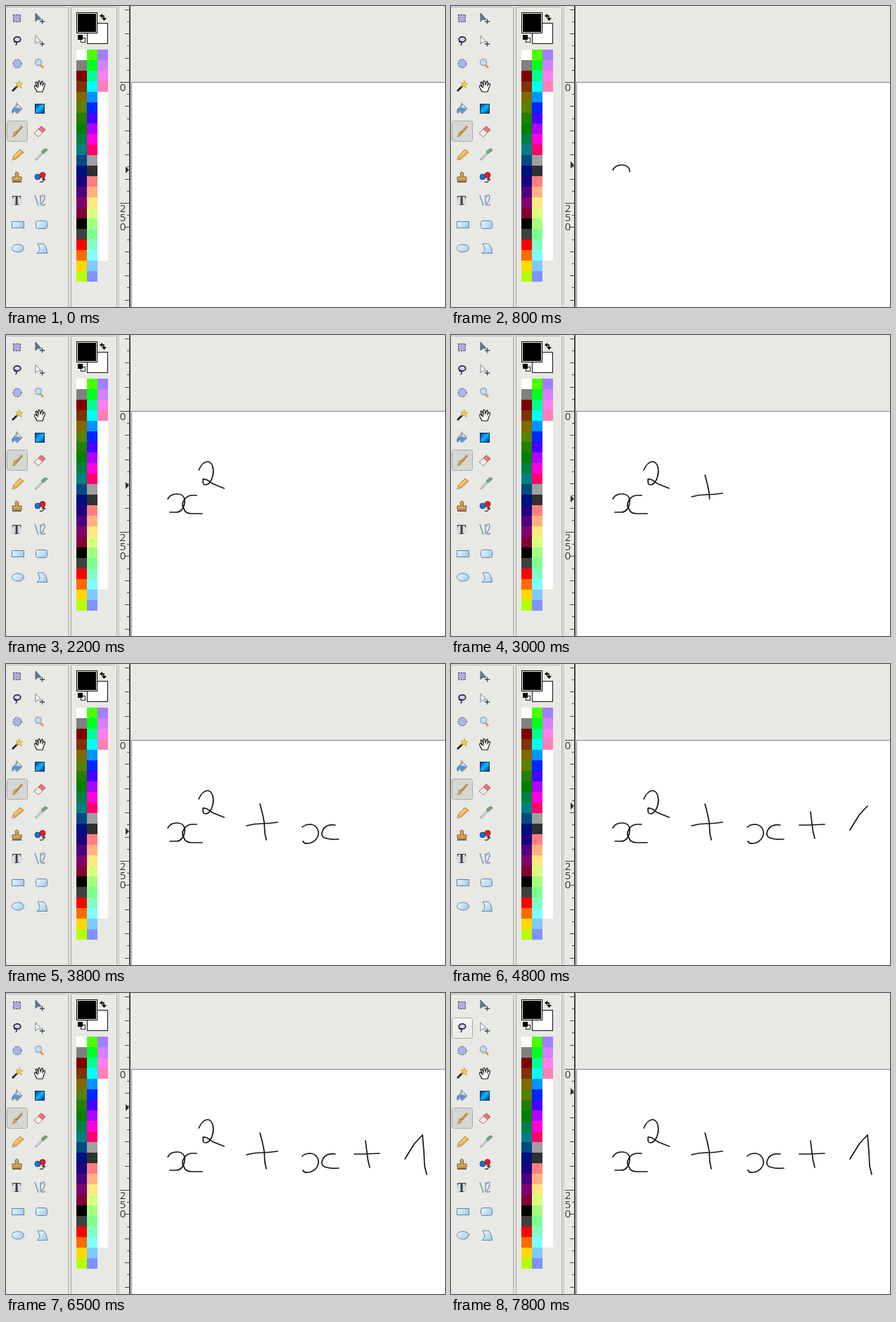
These frames come from a looping animation (624x428 px, 8 s). An HTML page with a canvas:

```html
<!DOCTYPE html>
<html lang="en">
<head>
<meta charset="utf-8">
<title>Handwritten formula in a paint program</title>
<style>
  html, body { margin: 0; width: 100%; height: 100%; overflow: hidden; background: #e8e8e4; }
  canvas { display: block; width: 624px; height: 428px; }
</style>
</head>
<body>
<canvas id="stage" width="624" height="428"></canvas>
<script>
const LOOP = 8000, STEP = 100;
const ctx = document.getElementById('stage').getContext('2d');
const PANEL = '#e8e8e4';

const swatches = [
  'fff 808080 800000 803300 806a00 5a8000 228000 008000 008044 008080 004a80 000f80 1b0080 4c0080 80006c 800037 000 404040 f00 ff6a00 ffd800 b5ff00',
  '4cff00 00ff21 00ff90 0ff 0094ff 0026ff 4800ff b200ff ff00dc ff006e a0a0a0 303030 ff7f7f ffb27f ffe97f daff7f a5ff7f 7fff8e 7fffc5 7fffff 7fc9ff 7f92ff',
  'a17fff d67fff ff7fed ff7fb6' + ' fff'.repeat(16)
].map(column => column.split(' '));

// Pen strokes: start ms, end ms, path
const strokes = [
  [600, 1000, 'M230 233C233 227 238 226 243 226C250 226 254 230 254 236C254 245 249 252 242 252L233 252'],
  [1100, 1500, 'M271 228L263 228C257 229 253 233 251 239Q250 244 253 247C254 252 259 254 265 254L279 254'],
  [1600, 2200, 'M274 192C277 185 282 180 287 180C294 181 296 192 294 200C292 208 288 213 284 213C280 213 280 211 280 205C286 204 289 209 295 212L310 218'],
  [2400, 2700, 'M342 230Q352 227 363 227Q374 227 386 225'],
  [2800, 3100, 'M361 199Q365 213 367 225L368 241L370 250'],
  [3200, 3500, 'M421 232C425 228 429 228 433 228C441 229 445 236 444 242C443 249 436 255 429 255Q424 256 422 252'],
  [3500, 3700, 'M468 229Q456 227 451 235C447 242 449 247 456 248Q462 250 473 249'],
  [3900, 4100, 'M495 229L509 229L531 228'],
  [4200, 4500, 'M511 210L513 226Q514 238 517 248'],
  [4600, 4800, 'M567 236Q575 223 580 215Q587 207 592 202'],
  [4800, 5000, 'M592 202L594 225L595 246L598 258']
].map(([start, end, d]) => {
  const shape = document.createElementNS('http://www.w3.org/2000/svg', 'path');
  shape.setAttribute('d', d);
  return { start, end, path: new Path2D(d), length: shape.getTotalLength() };
});

// Height of the pointer on the ruler
const pointerKeys = [
  [0, 233], [100, 231], [600, 231], [700, 229], [800, 226], [900, 240], [1000, 252],
  [1100, 230], [1200, 232], [1300, 246], [1400, 252], [1500, 229], [1600, 193],
  [1700, 186], [1800, 184], [1900, 199], [2000, 212], [2100, 209], [2200, 214],
  [2300, 214], [2400, 230], [2700, 225], [2800, 200], [3100, 249], [3200, 240],
  [3300, 229], [3400, 240], [3500, 252], [3600, 234], [3700, 248], [3800, 238],
  [3900, 230], [4100, 228], [4200, 211], [4500, 247], [4600, 236], [4800, 202],
  [4900, 230], [5000, 238], [5100, 240], [5300, 240], [5400, 226], [5500, 217],
  [5600, 217], [5700, 218], [5800, 218], [6500, 163], [6600, 140], [LOOP, 140]
];

const hovers = [[6800, 7200, 33, 99], [7200, 7800, 1, 67], [7800, LOOP, 1, 35]];

function rect(x, y, w, h, fill) {
  ctx.fillStyle = fill;
  ctx.fillRect(x, y, w, h);
}

function draw(d, fill, stroke, width = 1) {
  const path = typeof d === 'string' ? new Path2D(d) : d;
  if (fill) { ctx.fillStyle = fill; ctx.fill(path); }
  if (stroke) { ctx.strokeStyle = stroke; ctx.lineWidth = width; ctx.stroke(path); }
}

function oval(x, y, rx, ry, fill, stroke, width) {
  const path = new Path2D();
  path.ellipse(x, y, rx, ry, 0, 0, Math.PI * 2);
  draw(path, fill, stroke, width);
}

function box(x, y, w, h, r, fill, stroke) {
  const path = new Path2D();
  path.roundRect(x + .5, y + .5, w - 1, h - 1, r);
  draw(path, fill, stroke);
}

function blend(x0, y0, x1, y1, ...colors) {
  const g = ctx.createLinearGradient(x0, y0, x1, y1);
  colors.forEach((c, i) => g.addColorStop(i / (colors.length - 1), c));
  return g;
}

function label(text, x, y, font, fill) {
  ctx.font = font;
  ctx.fillStyle = fill;
  ctx.textAlign = 'center';
  ctx.fillText(text, x, y);
}

function drawPanels() {
  rect(0, 0, 624, 428, PANEL);
  for (const [x, w] of [[0, 88], [92, 66]]) rect(x, 1, w, 1, '#b4b4b0');
  for (const x of [88, 157]) {
    rect(x - 1, 1, 1, 427, '#f6f6f3');
    rect(x, 1, 1, 427, '#a4a4a0');
    rect(x + 1, 0, 2, 428, '#dededa');
  }
  rect(92, 1, 1, 427, '#a4a4a0');
  rect(160, 0, 1, 428, '#c8c8c4');
  rect(178, 108, 446, 320, '#85858a');
  rect(179, 109, 445, 319, '#fff');
}

function drawRuler() {
  rect(175, 0, 2, 428, '#444');
  for (let i = -7; i <= 18; i++) {
    const y = Math.round(108 + i * 17.2);
    const size = i % 10 === 0 ? 14 : i % 2 === 0 ? 7 : 4;
    rect(176 - size, y, size, 1, '#444');
  }
  const font = '15px "Open Sans", "Noto Sans", sans-serif';
  [['0', 121], ['2', 293], ['5', 306], ['0', 319]].forEach(([c, y]) => label(c, 166, y, font, '#333'));
}

function drawPalette() {
  rect(115, 24, 30, 30, '#111');
  rect(116, 25, 28, 28, '#fff');
  rect(100, 9, 30, 30, '#000');
  rect(101, 10, 28, 28, '#fff');
  rect(102, 11, 26, 26, '#000');
  draw('M135 14H139V18', null, '#000', 1.5);
  draw('M133 14L137 11V17ZM136 17H143L139.5 21Z', '#000');
  rect(106, 45, 7, 7, '#222');
  rect(107, 46, 5, 5, '#fff');
  rect(102, 41, 7, 7, '#000');
  swatches.forEach((column, i) => column.forEach((color, row) =>
    rect(100 + i * 15, 62 + row * 15, 15, 15, '#' + color)));
}

function arrowTool(y, fill, stroke) {
  draw(`M42 ${y - 8}V${y + 4}L45 ${y + 1}L50 ${y + 1}Z`, fill, stroke);
  draw(`M48 ${y + 4}H55M51.5 ${y + .5}V${y + 7.5}`, null, '#35485c', 1.3);
}

function drawSelectTools() {
  ctx.setLineDash([2, 1.5]);
  draw('M10.5 12.5H20.5V22.5H10.5Z', '#b5a6e0', '#39304c');
  oval(16, 82, 6, 6, '#a9b6e6', '#303860');
  ctx.setLineDash([]);
  arrowTool(18, '#607890', '#4c6074');
  arrowTool(50, '#fff', '#75818c');
  oval(16, 47.5, 4.8, 3.6, '#d9d4e8', '#30234e', 1.8);
  draw('M12 49Q11 52 14 51.5Q17 53 13.5 56', null, '#30234e', 1.4);
  draw('M49 84L53 88', null, '#d99a45', 3);
  oval(46, 80, 4.5, 4.5, '#c2ddf5', '#8fa2b4', 1.3);
}

function drawPaintTools() {
  draw('M9 121L17 113', null, '#222', 2.6);
  draw('M19 106L20 110L24 110L21 113L22 117L18 114L14 115L16 112L14 109L18 110Z', '#f3cf45', '#b88a20', .6);
  draw('M44 122C42 117 39 115 41 113C43 112 44 116 45 116L42 109Q44 106 46 113L46 107Q48 104 49 112L51 107Q53 106 52 113L54 110Q57 110 54 116L52 122Z', '#fff', '#111', 1.1);
  draw('M12 144L16 139L23 146L16 153L10 148Z', blend(10, 140, 22, 152, '#fff', '#aab8c6'), '#667788');
  draw('M15 144V137', null, '#667788');
  draw('M12 144L22 146L16 152L11 148Z', '#5b94cb');
  draw('M10 145Q7 149 9 153Q12 152 11 146Z', '#4a86c8');
  rect(41, 139, 14, 14, '#14264c');
  rect(42, 140, 12, 12, blend(42, 140, 54, 152, '#0038b8', '#00bff8', '#0030a8'));

  box(1, 163, 30, 30, 3, '#d6d6d2', '#aaaaa6');
  draw('M23 171L15 180', null, '#8b6428', 2.8);
  draw('M22.5 171L15.5 179', null, '#e0b55c', 1.3);
  draw('M15 179Q17 184 9 186Q12 184 11 181Q12 178 15 179Z', '#d7a83f', '#8a6420', .7);
  draw('M40 181L50 171L56 176L46 186Z', '#f7eded', '#a06d70');
  draw('M46 175L50 171L56 176L52 180Z', '#e6777c', '#a85055', .8);

  draw('M9 219L11 213L20 204L25 208L15 217Z', '#f0b14d', '#a8732a', .9);
  draw('M12 214L21 206', null, '#ffdc91', 1.4);
  draw('M9 219L10 215L13 218Z', '#f2dcae', '#806040', .5);
  draw('M42 219L52 209', null, '#8b9990', 2.6);
  draw('M43 218L51 210', null, '#dce8df', 1.1);
  draw('M50 207L53 210L59 205Q58 202 55 203Z', '#72a878', '#61866a', .8);
  draw('M13 238Q15 234 18 238L17 243H22V248H9V243H14Z', '#d6a653', '#75501f', .9);
  rect(9, 249, 13, 2, '#785b30');
  oval(45, 243, 4, 4, '#1473d4', '#123b6b', .8);
  oval(52, 240.5, 4, 4, '#ed1c24', '#7a1515', .8);
  draw('M48 250Q53 252 54 246M51 247L54 245L56 248', null, '#222', 1.2);
}

function drawShapeTools() {
  rect(8, 270, 14, 13, '#d8dcde');
  label('T', 15, 283, 'bold 19px "Liberation Serif", serif', '#353d43');
  draw('M41 269L46 284', null, '#7895b6', 1.5);
  draw('M50 272Q54 266 55 271Q55 276 51 281Q50 285 56 282M49 269V283', null, '#7895b6', 1.4);
  const edge = '#5584aa';
  box(8, 306, 18, 10, 0, blend(8, 306, 25, 316, '#edf8ff', '#9ccaeb'), edge);
  box(42, 305, 17, 12, 3, blend(42, 305, 59, 317, '#edf8ff', '#9ccaeb'), edge);
  oval(17, 344.5, 8.5, 5.5, blend(9, 339, 25, 350, '#edf8ff', '#9ccaeb'), edge);
  draw('M45 338H53Q58 342 58.5 351.5H44Q49 348 48 344Z', blend(45, 338, 58, 352, '#edf8ff', '#9ccaeb'), edge);
}

function pointerAt(t) {
  const next = pointerKeys.findIndex(([time]) => time > t);
  const [t0, y0] = pointerKeys[next - 1], [t1, y1] = pointerKeys[next];
  return Math.round(y0 + (y1 - y0) * (t - t0) / (t1 - t0));
}

function drawWriting(t) {
  ctx.save();
  ctx.lineCap = ctx.lineJoin = 'round';
  for (const { start, end, path, length } of strokes) {
    const progress = Math.min(1, (t - start) / (end - start));
    if (progress <= 0) continue;
    ctx.setLineDash(progress < 1 ? [length * progress, length * 2] : []);
    draw(path, null, '#151515', 1.7);
  }
  ctx.restore();
}

function render(t) {
  drawPanels();
  drawRuler();
  drawPalette();
  for (const [start, end, x, y] of hovers) {
    if (t >= start && t < end) box(x, y, 30, 30, 3, blend(0, y, 0, y + 30, '#f5f5f2', '#e9e9e5'), '#aaaaa6');
  }
  drawSelectTools();
  drawPaintTools();
  drawShapeTools();
  const y = pointerAt(t);
  draw(`M170 ${y - 5}L175 ${y}L170 ${y + 5}Z`, '#333');
  drawWriting(t);
}

function tick(now) {
  render(Math.floor(now % LOOP / STEP) * STEP);
  requestAnimationFrame(tick);
}

render(0);
requestAnimationFrame(tick);
</script>
</body>
</html>
```
